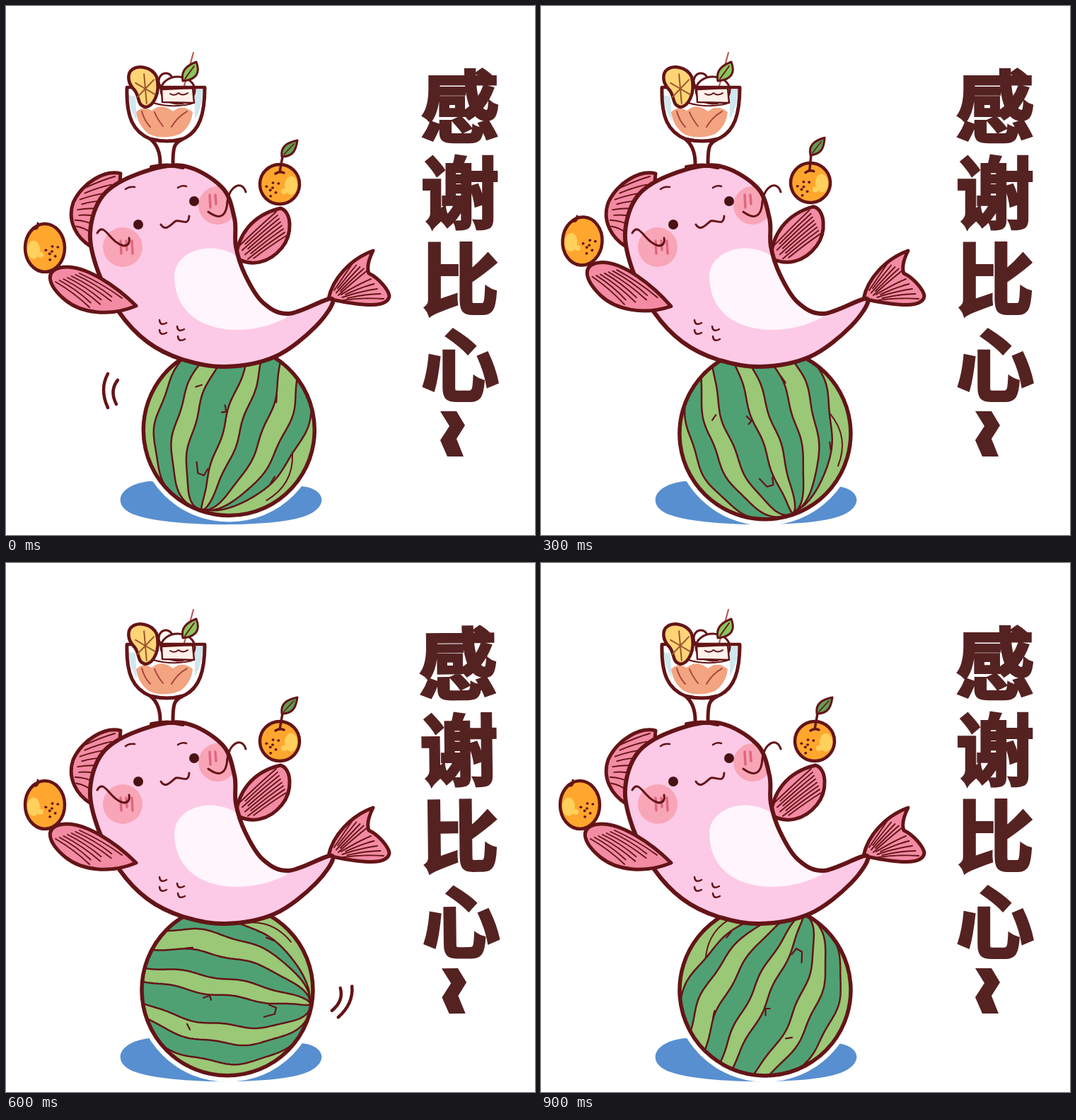
Animation of 748 by 748 pixels, one loop 1 s. Source, as an HTML page:

```html
<!DOCTYPE html>
<html lang="zh">
<head>
<meta charset="utf-8">
<style>
html, body { margin: 0; width: 100%; height: 100%; overflow: hidden; background: #fff; }
svg { display: block; width: 100vw; height: 100vh; }
text { font: 900 110px "Noto Sans CJK SC", "Noto Sans CJK", sans-serif; text-anchor: middle; }
</style>
</head>
<body>
<svg id="stage" viewBox="0 0 748 748" stroke-linecap="round" stroke-linejoin="round"></svg>
<script>
const INK = '#641417', TEXT = '#552222', BODY = '#fccae6', FIN = '#f28ba3', BLUSH = '#f9a5b8';
const LIGHT = '#9ac877', DARK = '#4fa174', ORANGE = '#ffa62e', SHINE = '#ffd05c';
const R = 121;

const mix = (a, b, k) => a.map((v, i) => v + (b[i] - v) * k);
const times = (n, make) => Array.from({ length: n }, (_, i) => make(i)).join('');
const path = (d, fill, width = 0, color = INK) =>
  `<path d="${d}" fill="${fill}" stroke="${width ? color : 'none'}" stroke-width="${width}"/>`;
const line = (d, width = 2.5, color = INK) => path(d, 'none', width, color);
const oval = (x, y, rx, ry, fill, width = 0) =>
  `<ellipse cx="${x}" cy="${y}" rx="${rx}" ry="${ry}" fill="${fill}" stroke="${width ? INK : 'none'}" stroke-width="${width}"/>`;
const group = (id, inner) => `<g id="${id}">${inner}</g>`;

// Smooth closed outline through a few points
function outline(text) {
  const p = text.split(' ').map(s => s.split(',').map(Number));
  const at = i => p[(i + p.length) % p.length];
  const handle = (from, a, b) => from.map((v, k) => v + (b[k] - a[k]) / 6);
  return 'M' + p[0] + times(p.length, i =>
    `C${handle(at(i), at(i - 1), at(i + 1))} ${handle(at(i + 1), at(i + 2), at(i))} ${at(i + 1)}`) + 'Z';
}

// Pencil strokes running from segment a-b to segment c-d
function hatch(a, b, c, d, n) {
  return line(times(n, i => {
    const from = mix(a, b, i / (n - 1));
    const to = mix(mix(c, d, i / (n - 1)), from, i % 2 * 0.12);
    const [x, y] = mix(from, to, 0.5);
    return `M${from}Q${x + 2},${y - 3} ${to}`;
  }), 1.9);
}

// Edge of a stripe: a wavy meridian that crosses the middle at height `mid`
// and runs into the visible pole at the right
function meridian(mid, phase) {
  const points = [];
  for (let x = -125; x <= 118; x += 3) {
    const axis = x * 0.17;
    const spread = Math.sqrt(Math.max(0, 1 - ((x + 26) / 144) ** 2));
    const wave = 2.2 * Math.sin(x / 14 + phase);
    points.push([x, (axis + (mid + wave) * spread).toFixed(1)]);
  }
  return points;
}

function melon() {
  const stripes = [[-104, -78], [-48, -16], [9, 51], [77, 105]];
  const bands = stripes.map(([top, low], i) => {
    const a = meridian(top, i * 2), b = meridian(low, i * 2 + 1);
    return path(`M${a.join('L')}L${b.reverse().join('L')}Z`, DARK) + line(`M${a.join('L')}M${b.join('L')}`);
  }).join('');
  return oval(0, 0, R, R, LIGHT) +
    `<g clip-path="url(#rind)">${bands}${line('M20,-94Q62,-102 90,-68', 2)}</g>` +
    line('M-60,-59l11,-1M-34,11l9,-3l2,6M52,38l15,-4l2,-9l-10,-4M-57,48l4,8M55,-74l10,4', 2.2) +
    oval(0, 0, R, R, 'none', 5.5);
}

// Dimples along a small spiral
const dimples = (x, y) => times(7, i =>
  oval(x + 4.4 * Math.sqrt(i) * Math.cos(2.4 * i), y + 5 * Math.sqrt(i) * Math.sin(2.4 * i), 2, 1.8, INK));
const fruit = (ry, side) => oval(0, 0, 28, ry, ORANGE) +
  oval(16 * side, ry / 6 - 3, 9, 13, SHINE) + oval(6 * side, 10, 4, 4, SHINE) +
  oval(0, 0, 28, ry, 'none', 4.5) + dimples(-10 * side, 5);

const leftOrange = fruit(34, -1) + line('M-14,-27Q-9,-27 -10,-35', 3);
const rightOrange = fruit(28, 1) + line('M-6,-15Q0,-19 6,-16M0,-17L4,-39', 3.5) +
  path('M3,-39C1,-53 10,-59 25,-62C23,-48 19,-39 3,-39Z', '#659b55', 3) + line('M6,-42L20,-57', 1.5);

const leftFin = path('M184,424C160,400 110,362 76,370C54,376 60,396 84,416C106,434 146,440 184,424Z', FIN, 5) +
  hatch([104, 378], [70, 390], [164, 413], [118, 426], 7);
const rightFin = path('M325,356C328,326 346,296 388,286C404,290 406,322 390,342C372,364 346,369 325,356Z', FIN, 5) +
  hatch([382, 291], [396, 325], [330, 339], [344, 361], 8);
const backFins =
  path('M162,237C140,231 108,250 95,278C86,304 100,328 120,340L160,260Z', FIN, 5) +
  hatch([154, 241], [122, 322], [108, 259], [96, 310], 8) +
  path('M456,414C462,385 487,358 519,346C512,360 510,370 513,378C528,385 541,402 542,410C540,427 506,425 456,414Z', FIN, 5) +
  hatch([490, 364], [511, 374], [464, 402], [470, 409], 5) +
  hatch([516, 386], [534, 414], [474, 408], [477, 416], 5);

const skin = outline('185,238 250,226 305,256 323,300 325,340 338,380 363,419 400,435 461,414 438,453 ' +
  '380,496 310,510 250,500 200,475 160,433 130,375 119,320 137,268');

const scales = [[222, 447], [222, 461], [247, 456], [248, 470]]
  .map(([x, y]) => line(`M${x - 5},${y - 3}q1,9 10,4`)).join('');
const blushLines = (x, y, n) => line(times(n, i => `M${x + i * 8},${y}l1,${18 - i % 2 * 5}`), 3.5, '#e0667f');

const fish = path(skin, BODY) +
  `<g clip-path="url(#skin)">` +
  path('M238,381C240,346 290,330 327,354C344,400 362,424 398,440C340,472 238,466 238,381Z', '#fff5fc') +
  oval(165, 341, 28, 28, BLUSH) + oval(299, 282, 27, 27, BLUSH) + '</g>' +
  path(skin, 'none', 6) + blushLines(162, 332, 3) + blushLines(288, 267, 2) +
  line('M129,321C139,304 146,334 166,339Q176,339 174,328', 3) +
  line('M286,291C302,303 312,298 313,276C316,254 334,246 339,263', 3) +
  oval(187, 309, 7, 7, '#4a1215') + oval(266, 276, 7, 7, '#4a1215') +
  line('M169,259Q174,255 182,256M243,257Q249,253 255,255') +
  line('M219,309C226,320 234,308 240,304C248,302 258,312 259,297', 3) +
  scales + line('M168,446l10,9');

const bowl = 'M171,116C170,158 180,178 204,188Q219,200 218,226';
const bowlRight = 'C236,196 238,195 250,188C274,178 281,152 281,116';
const segments = times(6, i => {
  const a = i * Math.PI / 3 + 0.4;
  return `M197,117l${15 * Math.cos(a)},${21 * Math.sin(a)}`;
});
const cup =
  path(`${bowl}H236${bowlRight}Z`, '#fff') +
  path('M267,118H279Q277,145 267,160Z', '#cfe7ee') + path('M173,126Q176,150 185,163L183,128Z', '#cfe7ee') +
  path('M184,150Q194,140 206,148Q220,136 236,149Q250,138 264,150Q262,170 246,181Q222,190 202,181Q187,170 184,150Z', '#f3a481') +
  line('M192,149q4,14 12,22M210,150q4,10 12,20M256,149q-14,8 -22,22', 2, '#a7473b') +
  oval(226, 106, 10, 11, '#fff', 3) + oval(243, 119, 24, 19, '#fff', 3) +
  path('M220,118L264,116L266,137L221,136Z', '#fff0ea', 2.5) +
  line('M232,124q6,4 12,-1q6,5 13,0M208,137q28,8 55,1', 2) +
  line('M265,66L252,113', 2.2, '#b85b56') +
  path('M250,106C247,91 256,84 269,79C275,94 270,104 250,106Z', '#8ac55c', 3) + line('M253,103L266,85', 1.8) +
  line('M171,115H281', 4.5) +
  path('M176,92C186,82 206,86 213,100C219,124 208,142 197,143C184,140 190,126 180,117C172,108 172,98 176,92Z', '#ffd477', 4.5) +
  line(segments, 2, '#9b552e') +
  line(`${bowl}M236,226${bowlRight}M204,188Q228,194 250,188`, 5) +
  line('M206,228Q227,223 250,228', 6);

const words = [...'感谢比心'].map((c, i) => `<text x="642" y="${184 + i * 122}">${c}</text>`).join('') +
  path('M614,573H637L649,593L637,612L647,637H624L614,614L627,594Z', TEXT);

const stage = document.getElementById('stage');
stage.innerHTML =
  `<clipPath id="rind"><circle r="${R}"/></clipPath><clipPath id="skin">${path(skin, '#000')}</clipPath>` +
  path('M202,672C154,678 150,710 184,720C230,737 386,738 426,720C458,706 450,682 418,679Z', '#588fd0') +
  group('halo', oval(0, 0, 130, 130, '#fff')) + group('melon', melon()) +
  group('swish', line('M-6,-24q-12,22 0,48M8,-15q-12,15 -2,34', 4.5)) +
  group('rightFin', rightFin) + backFins + fish + group('leftFin', leftFin) + cup +
  group('leftOrange', leftOrange) + group('rightOrange', rightOrange) +
  `<g id="words" fill="${TEXT}" stroke="${TEXT}" stroke-width="4" stroke-linejoin="miter">${words}</g>`;

// Key poses of the rolling melon: [step, degrees]
const roll = [[0, 99], [3, 61], [4, 35], [6, 0], [9, -73]];

function rollAt(step) {
  const i = roll.findIndex(([s], k) => k && step <= s);
  const [s0, a0] = roll[i - 1], [s1, a1] = roll[i];
  return a0 + (a1 - a0) * (step - s0) / (s1 - s0);
}

const set = (id, value) => document.getElementById(id).setAttribute('transform', value);
const place = ([x, y], angle) => `translate(${x} ${y}) rotate(${angle})`;

function draw(time) {
  const step = Math.floor(time % 1000 / 100);

  // The centre circles slightly because the melon is not quite round
  const turn = rollAt(step), wobble = (turn - 33) * 2.6 * Math.PI / 180;
  const centre = [315 + 2 * Math.sin(wobble), 603.5 + 4 * Math.cos(wobble)];
  set('halo', place(centre, 0));
  set('melon', place(centre, turn));

  const lift = Math.max(0, 1 - Math.abs(step - 2) / 2);
  set('leftFin', `rotate(${8 * lift} 176 422)`);
  set('rightFin', `rotate(${-4.5 * lift} 328 356)`);
  set('leftOrange', place(mix([55, 342], [62, 323], lift), 8 * lift));
  set('rightOrange', place(mix([387, 252], [375, 248], lift), -9 * lift));

  // Swishes alternate sides, first high and then low
  const side = step % 4 ? -1 : 1, low = step >= 4;
  set('swish', `translate(${312 - side * 162} ${low ? 618 : 544}) scale(${side} 1) rotate(${low ? -24 : 0})`);
  document.getElementById('swish').setAttribute('visibility', step % 2 || step > 6 ? 'hidden' : 'visible');

  const beat = step - 6, swaying = step > 4 && step < 9;
  const sway = swaying ? -0.65 * Math.cos(Math.PI * beat) * 0.5 ** Math.abs(beat) : 0;
  set('words', `rotate(${sway} 642 400)`);
}

const start = performance.now();
function tick() {
  draw(performance.now() - start);
  requestAnimationFrame(tick);
}
tick();
</script>
</body>
</html>
```
